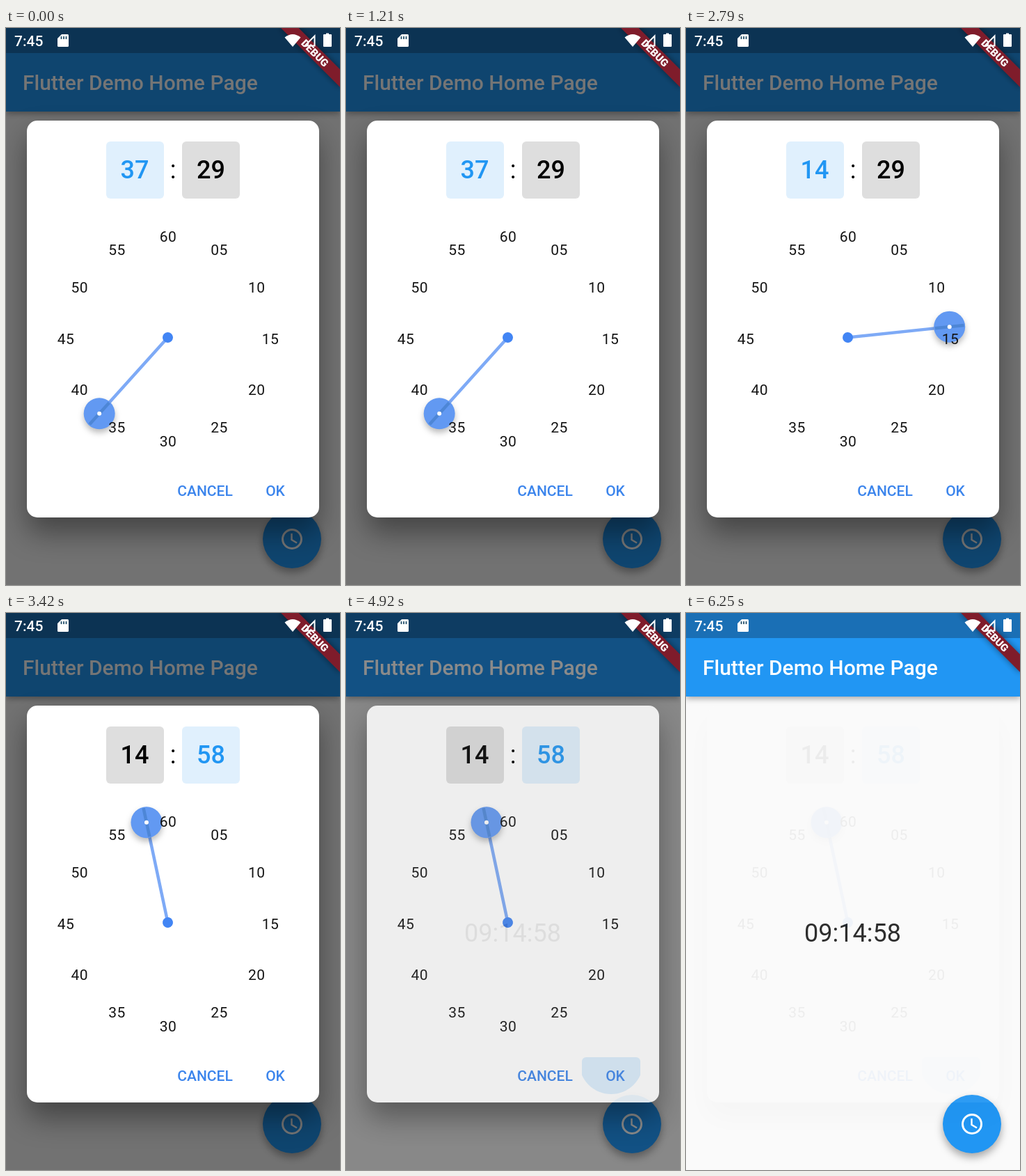
An HTML page for the animation above (6.29 s loop, 480 by 800 pixels).

```html
<!DOCTYPE html>
<html lang="en">
<head>
<meta charset="utf-8">
<title>Time picker</title>
<style>
  html, body { margin: 0; width: 100%; height: 100%; overflow: hidden; }
  svg { display: block; width: 480px; height: 800px; background: #fafafa; }
  text { font: 21px Roboto, sans-serif; text-anchor: middle; }
  .medium { font-weight: 500; }
  .big { font-size: 36px; }
  .left { text-anchor: start; }
  .button { fill: #3c85ec; }
  .box rect { fill: #dedede; }
  .box.on rect { fill: #e0f0fd; }
  .box.on text { fill: #2196f3; }
  #bar { filter: drop-shadow(0 3px 4px #0005); }
  #fab { filter: drop-shadow(0 6px 6px #0005); }
  #panel { filter: drop-shadow(0 22px 20px #0006); }
  #knob { filter: drop-shadow(0 5px 4px #0004); }
  #banner { filter: drop-shadow(0 0 5px #0007); }
  #labels text { letter-spacing: .4px; }
</style>
</head>
<body>
<svg viewBox="0 0 480 800">
  <defs>
    <clipPath id="ripple"><circle id="rippleShape" cx="381" cy="645"/></clipPath>
  </defs>

  <g id="page">
    <text class="big" x="239.5" y="472" fill="#222">09:14:58</text>
    <rect id="bar" width="480" height="120" fill="#2196f3"/>
    <rect width="480" height="36" fill="#1a6fb5"/>
    <text class="medium left" x="24" y="89" fill="#fff" style="font-size:30px">Flutter Demo Home Page</text>
    <circle id="fab" cx="411" cy="734" r="42" fill="#2196f3"/>
    <g fill="none" stroke="#fff" stroke-width="3">
      <circle cx="411" cy="734" r="13.5"/>
      <path d="M410.5 726v9l7.5 4.5" stroke-width="2.4"/>
    </g>
  </g>
  <rect id="barrier" width="480" height="800"/>

  <g id="dialog">
    <rect id="panel" x="30" y="133" width="420" height="570" rx="15" fill="#fff"/>
    <g class="box" id="minuteBox">
      <rect x="144" y="163" width="83" height="82" rx="6"/>
      <text class="big medium" x="185" y="216"></text>
    </g>
    <text class="big" x="240" y="216">:</text>
    <g class="box" id="secondBox">
      <rect x="253" y="163" width="83" height="82" rx="6"/>
      <text class="big medium" x="294.5" y="216"></text>
    </g>

    <g id="hand">
      <path d="M0 0V-147" stroke="#7eaaf6" stroke-width="4.5"/>
      <circle r="7.5" fill="#4285f4"/>
    </g>
    <circle id="knob" r="22.5" fill="#6299f2"/>
    <path id="tip" d="M0 -126V-168" stroke="#4d86d6" stroke-width="4.5"/>
    <circle id="dot" r="3" fill="#fff"/>
    <g id="labels" fill="#141414"></g>

    <rect x="339" y="638" width="84" height="53" rx="6" fill="#2196f3" fill-opacity=".16" clip-path="url(#ripple)"/>
    <text class="medium button" x="286" y="672">CANCEL</text>
    <text class="medium button" x="387" y="672">OK</text>
  </g>

  <g transform="translate(480 0) rotate(45)">
    <rect id="banner" x="-60" y="42" width="120" height="18" fill="#7f1c2b"/>
    <text x="0" y="56.3" fill="#fff" style="font-size:15px;font-weight:900">DEBUG</text>
  </g>
  <g fill="#fff">
    <text class="medium left" x="12" y="26">7:45</text>
    <path d="M80 9H88.5Q90 9 90 10.5V25.5Q90 27 88.500 27H75.500Q74 27 74 25.500V15Z"/>
    <path d="M79.500 12v4m3.500-4v4m3.500-4v4" stroke="#1c4a66" stroke-width="1.700"/>
    <path d="M400.500 13.500Q412 4.500 423.500 13.500L412 27Z"/>
    <path d="M443.500 11.500V25.500H429.500Z" fill="none" stroke="#fff" stroke-width="2"/>
    <path d="M460 9V7.500h4V9h3q1 0 1 1v16q0 1-1 1h-10q-1 0-1-1V10q0-1 1-1Z"/>
  </g>
</svg>

<script>
const LOOP = 6290, CX = 232.5, CY = 444.5, RADIUS = 147;
const $ = id => document.getElementById(id);
const set = (id, attrs) => Object.entries(attrs).forEach(([k, v]) => $(id).setAttribute(k, v));
const ramp = (t, from, to) => Math.min(1, Math.max(0, (t - from) / (to - from)));
const smooth = p => p * p * (3 - 2 * p);
const lerp = (a, b, p) => a + (b - a) * p;

for (let value = 5; value <= 60; value += 5) {
  const angle = value * Math.PI / 30;
  const label = document.createElementNS('http://www.w3.org/2000/svg', 'text');
  label.setAttribute('x', 233 + RADIUS * Math.sin(angle));
  label.setAttribute('y', 453.5 - RADIUS * Math.cos(angle));
  label.textContent = String(value).padStart(2, '0');
  $('labels').append(label);
}

function showBox(id, value, selected) {
  $(id).classList.toggle('on', selected);
  $(id).lastElementChild.textContent = String(value).padStart(2, '0');
}

function draw(t) {
  // The minute is dragged clockwise past 60, then slips back by one.
  const onSeconds = t >= 3170;
  const minute = t >= 2090 ? 14 : Math.round(lerp(37, 75, smooth(ramp(t, 1220, 1880)))) % 60;
  const second = Math.round(lerp(29, 58, smooth(ramp(t, 3170, 3420))));
  showBox('minuteBox', minute, !onSeconds);
  showBox('secondBox', second, onSeconds);

  const value = onSeconds ? second : minute;
  const angle = value * Math.PI / 30;
  const x = CX + RADIUS * Math.sin(angle), y = CY - RADIUS * Math.cos(angle);
  const turn = `translate(${CX} ${CY}) rotate(${value * 6})`;
  set('hand', { transform: turn });
  set('tip', { transform: turn });
  set('knob', { cx: x, cy: y });
  set('dot', { cx: x, cy: y });

  // Pressing OK, then the dialog and its barrier fade away.
  const closing = ramp(t, 4885, 5130);
  set('rippleShape', { r: t < 4710 ? 0 : lerp(10, 46, ramp(t, 4710, 4920)) });
  set('barrier', { opacity: 0.54 * (1 - closing) });
  set('dialog', { opacity: lerp(1, 0.05, closing) });
}

function frame(now) {
  draw(now % LOOP);
  requestAnimationFrame(frame);
}
draw(0);
requestAnimationFrame(frame);
</script>
</body>
</html>
```
